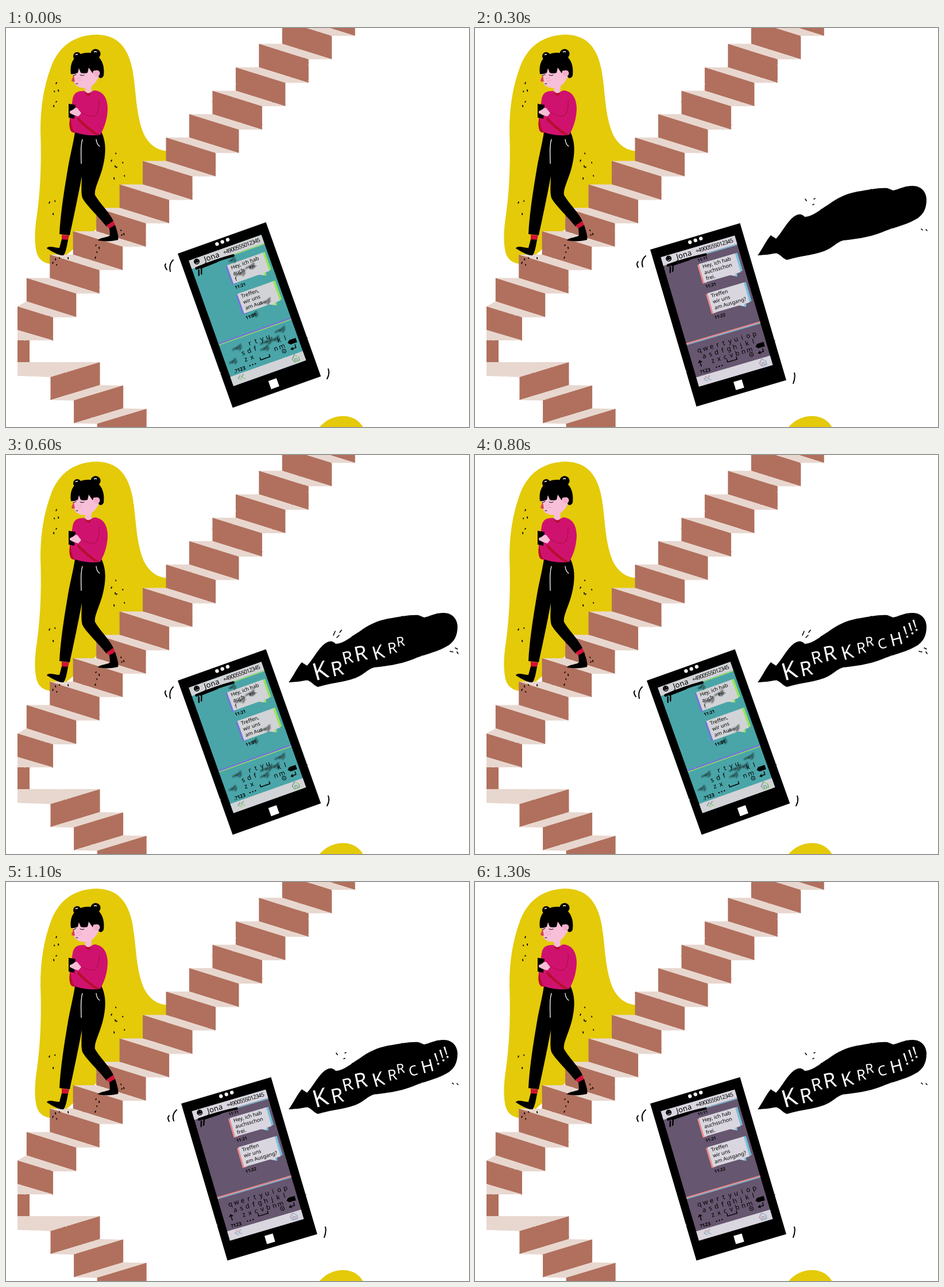
An HTML page for the animation above (1.4 s loop, 806x695 px).

```html
<!DOCTYPE html>
<html lang="de">
<head>
<meta charset="utf-8">
<title>Krrrkrrch</title>
<style>
  html, body { margin: 0; width: 100%; height: 100%; overflow: hidden; background: #fff; }
  svg { display: block; width: 806px; height: 695px; }
  text { white-space: pre; font-family: "Noto Sans", sans-serif; }
  .ink { fill: none; stroke: #000; stroke-linecap: round; stroke-linejoin: round; }
</style>
</head>
<body>
<svg viewBox="0 0 806 695">
  <defs>
    <filter id="rough" x="-2%" y="-2%" width="104%" height="104%" color-interpolation-filters="sRGB">
      <feTurbulence type="fractalNoise" baseFrequency=".35" numOctaves="2" seed="4"/>
      <feDisplacementMap in="SourceGraphic" scale="1.7" xChannelSelector="R" yChannelSelector="G"/>
    </filter>
    <filter id="soft" x="-30%" y="-30%" width="160%" height="160%"><feGaussianBlur stdDeviation=".9"/></filter>
  </defs>

  <g filter="url(#rough)" fill="#e4ca08">
    <path d="M285 214C266 215 250 205 240 185C229 160 227 128 224 100C221 66 214 42 199 27C185 12 160 9 142 13C112 18 91 36 79 66C65 103 60 140 60 180C62 235 60 280 54 325C50 350 49 372 53 390C56 402 64 409 77 411L100 400L290 235Z"/>
    <path d="M545 696C556 683 570 676 587 676C604 676 615 684 622 696Z"/>
  </g>
  <g id="stairs" filter="url(#rough)"></g>

  <g id="walker">
    <path d="M120 181C135 186 152 187 166 181C174 197 175 217 168 244C162 266 153 281 155 291C163 305 179 320 187 336L175 346C160 327 139 308 133 296C130 286 132 268 132 258C128 280 120 320 111 361L93 359C95 320 103 272 109 237C114 212 118 196 120 181Z"/>
    <path d="M133 194C129 207 131 222 131 236M157 194Q158 203 163 206" fill="none" stroke="#fff" stroke-width="1.3" stroke-linecap="round"/>
    <path d="M97 360L110 361L108 370L97 368ZM175 344L187 336L190 344L180 350Z" fill="#cf1238"/>
    <path d="M97 368L108 369C106 380 104 392 100 396C92 397 80 389 71 384C73 378 85 383 93 383ZM180 349L190 343C193 353 197 364 195 369C185 372 170 372 160 370C162 365 178 365 181 361Z"/>
    <path d="M139 98L149 100L148 118L136 117Z" fill="#f5bdd6"/>
    <path d="M137 110C126 109 118 112 116 124C114 140 108 160 112 178C114 182 117 183 121 182C135 187 153 188 164 186C171 175 177 157 177 139C176 122 170 112 157 109C151 108 148 112 145 114Q138 116 137 110Z" fill="#d0126f"/>
    <path d="M112 157C114 164 114 175 120 182C112 182 108 172 112 157ZM126 155C135 165 148 177 163 186L155 186C142 177 132 168 124 160ZM137 109Q141 116 148 112L146 118Q138 119 137 109Z" fill="#b40f2c"/>
    <path d="M130 146C141 153 153 158 160 148M162 125Q163 140 158 150" fill="none" stroke="#a50d3c" stroke-width="1"/>
    <path d="M109 132L121 134L119 158L109 156Z"/>
    <path d="M111 145L117 142C121 137 125 139 126 142L131 148L126 154C121 153 116 151 111 148Z" fill="#f5bdd6"/>
    <path d="M116 68C116 80 117 94 121 99C126 105 140 106 147 102C156 98 163 85 164 75L150 60Z" fill="#f7c0d8"/>
    <path d="M118 82Q114 90 114 92Q117 95 120 93Z" fill="#d84757"/>
    <path d="M113 80C110 56 123 43 144 43C163 44 173 62 170 83C167 89 162 88 161 84C161 75 154 72 152 75L151 79L144 69L142 78Q135 80 130 78L127 70L125 78Q119 81 113 80Z"/>
    <circle cx="124" cy="49" r="7"/><circle cx="156" cy="45" r="8.6"/>
    <path d="M121 47Q123 45 125 46M153 42Q156 40 158 42" fill="none" stroke="#fff" stroke-width="1.4"/>
    <circle cx="158" cy="79" r="5.5" fill="#f5aeca"/>
    <path class="ink" stroke-width="1" d="M117 83L122 81M129 82Q133 84 136 82M122 97L125 97"/>
    <path d="M125 88h.1M129 87h.1M131 91h.1M127 92h.1" stroke="#d84757" stroke-width="1.2" stroke-linecap="round"/>
  </g>
  <g id="specks" class="ink" stroke-width="1.8"></g>
  <g id="poses"></g>

  <path id="spark" class="ink" stroke-width="2" d="M493 395L509 385L514 386L526 381L537 378"/>
  <g id="shout">
    <path filter="url(#rough)" d="M492 396C500 386 506 371 515 361L524 367C533 358 540 343 551 332C560 323 568 322 574 329C589 328 601 316 616 307C631 296 645 289 665 285C686 282 702 278 718 279L728 283C738 281 747 275 762 275C777 275 786 286 786 299C786 315 780 327 766 334C746 345 726 348 708 356C686 365 659 368 641 370C629 373 623 383 607 389C588 396 565 397 543 404C536 402 534 396 524 392C513 395 504 395 492 396Z"/>
    <g id="letters" fill="#fff" font-weight="500" text-anchor="middle"></g>
    <path id="ticks0" class="ink" stroke-width="1.6" d="M570 314L573 307M576 318L580 314M581 309L584 305M773 342L778 343M782 336L786 338M785 343L787 346"/>
    <path id="ticks1" class="ink" stroke-width="1.6" d="M575 298L577 301M588 308L590 307M590 298L592 297M777 350L779 352M785 351L787 353"/>
  </g>
</svg>
<script>
const LOOP = 1400, STEP = 100;
const $ = id => document.getElementById(id);
const poly = (fill, ...p) => `<polygon fill="${fill}" points="${p.join(' ')}"/>`;
const rect = (x, y, w, h, fill) => `<rect x="${x}" y="${y}" width="${w}" height="${h}" fill="${fill}"/>`;
const line = (d, color, w) => `<path d="${d}" fill="none" stroke="${color}" stroke-width="${w}" stroke-linecap="round"/>`;
const text = (x, y, size, str, extra = '') => `<text x="${x}" y="${y}" font-size="${size}" ${extra}>${str}</text>`;

function stairs() {
  const brown = '#b0705d', pale = '#e8d7cf', dx = 40.45, dy = 40.8, w = 86.5, h = 27;
  let out = '';
  for (let i = 0; i < 13; i++) {
    const x = 521.2 - i * dx, y = -54 + i * dy;
    out += poly(pale, x, y, x + dx, y, x + dx + w, y + h, x + w, y + h)
         + poly(brown, x, y, x + w, y + h, x + w, y + h + dy, x, y + dy);
  }
  out += poly(pale, 20, 485, 36, 476, 122, 504, 82, 504)
       + poly(brown, 20, 485, 82, 504, 82, 545, 20, 526)
       + poly(pale, 20, 526, 82, 544, 20, 544)
       + poly(brown, 20, 544, 41, 544, 41, 582, 20, 582)
       + poly(pale, 20, 582, 163, 582, 78, 608, 20, 606);
  for (let i = 0; i < 3; i++) {
    const x = 77.5 + i * 40.6, y = 608 + i * 40.6;
    out += poly(brown, x, y, x + 86, y - 26, x + 86, y + 14, x, y + 40)
         + poly(pale, x, y + 40, x + 86, y + 14, x + 126, y + 15, x + 41, y + 41);
  }
  return out;
}

function specks() {
  const spots = [[88, 95], [84, 110], [91, 108], [88, 128], [83, 135], [191, 218], [184, 230], [203, 234],
    [190, 240], [193, 242], [188, 261], [206, 257], [76, 303], [85, 301], [82, 323], [157, 378], [162, 382],
    [158, 390], [156, 399], [200, 352], [205, 358], [202, 360], [86, 402], [88, 412], [82, 408], [93, 400], [108, 400]];
  return spots.map(([x, y], i) => `<path d="M${x} ${y}l${i % 3 ? .4 : -.8} ${i % 2 ? 1 : 2}"/>`).join('');
}

// A speech bubble with coloured fringes on both sides
function bubble(y, h, lines, p) {
  return rect(71, y + 1, 8, h, p.left) + rect(136, y, 8, h - 1, p.right)
    + poly(p.right, 122, y + h, 134, y + h, 132, y + h + 6)
    + rect(74, y, 66, h, p.paper)
    + poly(p.paper, 119, y + h - 1, 131, y + h - 1, 129, y + h + 4)
    + lines.map((s, i) => text(79, y + 9.5 + i * 10.8, 9, s, 'font-weight="500"')).join('');
}

function keyRow(x, y, keys) {
  return [...keys].map((k, i) => text(x + i * 11.1, y, 11.5, k, 'text-anchor="middle" font-weight="500"')).join('');
}

function phone(p) {
  const smears = p.smears.map(([x, y, l]) =>
    line(`M${x - l} ${y + 2}l${l} -1.5M${x - 2} ${y + 3}l${l} -5M${x + 2} ${y + 6}l${l / 2} -4`, '#101818', 2.2)).join('');
  return `<g transform="translate(${p.x} ${p.y}) rotate(${p.angle})">`
    + `<rect width="163" height="285" filter="url(#rough)"/>`
    + [70, 80, 90].map((x, i) => `<circle cx="${x}" cy="${7.2 - i * .4}" r="3.2" fill="#fff"/>`).join('')
    + rect(14, 18, 134, p.bottom - 18, p.screen)
    + rect(14, 18, 134, 15.5, p.paper)
    + line('M92 34.5H147', p.right, 1.5)
    + `<circle cx="26.5" cy="24" r="5"/>`
    + line('M24.5 22.5h.1M28.5 22.5h.1M24 26q2.5 2 5 0', p.paper, 1)
    + text(40, 29.5, 13, 'Jona', 'font-weight="500" letter-spacing=".2"')
    + text(75, 28.5, 9.8, '+4900555012345', 'font-weight="500" letter-spacing="-.8"')
    + line('M22 35Q55 33 90 35.5M30 36L60 35', '#000', 4.5)
    + line('M25 39l-3 9M30 39l-3 8', '#000', 2.4)
    + text(74, 44, 7, p.times[0], 'font-weight="600"')
    + bubble(48, 34, p.first, p) + text(74, 92, 7.5, p.times[1], 'font-weight="600"')
    + bubble(101, 36, p.second, p) + text(74, 148, 7.5, p.times[2], 'font-weight="600"')
    + line(`M15 ${p.keys}H147`, p.left, 2.6) + line(`M15 ${p.keys + 2}H147`, p.edge, 1.4)
    + `<g transform="translate(0 ${p.keys - 175})">`
    + keyRow(32.5, 196, p.rows[0]) + keyRow(38, 208, p.rows[1]) + keyRow(50, 220, p.rows[2])
    + (p.arrow ? line('M28 220V210M25 213l3 -3l3 3', '#000', 1.5) : '')
    + '<path d="M128 214l4-4h12v8h-12z"/>'
    + line('M139 221v5h-9m3 -2l-3 2l3 2M74 222v4h17v-4', '#000', 1.5)
    + line('M53 229h.1M58 229h.1M63 229h.1', '#000', 2.3)
    + '<circle cx="117.5" cy="225" r="3.2" fill="none" stroke="#000"/><circle cx="117.5" cy="225" r="1"/>'
    + text(23, 232.5, 8.5, p.arrow ? '?123' : '.?123', 'font-weight="600"') + '</g>'
    + rect(14, p.bottom - 17, 134, 17, p.paper)
    + [[0, p.left], [1, p.edge]].map(([d, c]) => `<g transform="translate(${d} ${p.bottom - 9 + d})">`
      + line('M31 -5l-5 4l5 4M37 -5l-5 4l5 4', c, 1)
      + line('M126 -1l6 -6l6 6l-1 6h-9zM130 5v-5h4v5', c, 1) + '</g>').join('')
    + rect(74, 262, 15, 15, '#fff')
    + `<g filter="url(#soft)" opacity=".75">${smears}</g>`
    + `</g><path class="ink" stroke-width="2" d="${p.shake}"/>`;
}

const poses = [
  {
    x: 299, y: 393, angle: -19.6, bottom: 250, keys: 172,
    screen: '#4aa5a8', paper: '#d2d3d6', left: '#7672dc', right: '#98e45a', edge: '#98e45a',
    times: ['', '11:21', '11:21'],
    first: ['Hey, ich hab', 'auch    en-', 'f'], second: ['Treffen,', 'wir uns', 'am Aus'],
    rows: ['   rtyu   ', ' sdf   kl', 'zx   nm'], arrow: false,
    smears: [[92, 68, 10], [112, 62, 9], [86, 41, 6], [116, 129, 11], [90, 143, 7], [43, 188, 9],
      [95, 195, 12], [124, 184, 10], [28, 208, 7], [110, 196, 9], [88, 205, 8]],
    shake: 'M280 421Q275 414 278 411M286 424Q283 412 291 404M561 594Q564 602 559 611'
  },
  {
    x: 305, y: 386, angle: -16.4, bottom: 253, keys: 175,
    screen: '#66566f', paper: '#d9d6df', left: '#e98a8c', right: '#79bfdc', edge: '#79bfdc',
    times: ['11:11', '11:21', '11:22'],
    first: ['Hey, ich hab', 'auchsschon', 'frei.'], second: ['Treffen', 'wir uns', 'am Ausgang?'],
    rows: ['qwertyuiop', 'asdfghjkl', 'zxcvbnm'], arrow: true,
    smears: [],
    shake: 'M284 417Q280 410 284 407M292 416Q288 405 297 397M556 601Q558 609 554 619'
  }
];

// glyph, centre x, baseline y, size, tilt
const glyphs = [['K', 551, 390, 42, -16], ['R', 579, 384, 35, -12], ['R', 597, 363, 30, -14], ['R', 620, 358, 36, -12],
  ['K', 651, 355, 33, -16], ['R', 674, 345, 26, -10], ['R', 688, 333, 23, -10], ['C', 711, 337, 24, -16],
  ['H', 736, 331, 30, -14], ['!', 753, 318, 29, -18], ['!', 762, 312, 29, -18], ['!', 769, 306, 28, -18]];
const typed = [0, 0, 0, 0, 1, 4, 7, 9, 12];

$('stairs').innerHTML = stairs();
$('specks').innerHTML = specks();
$('poses').innerHTML = poses.map(p => `<g>${phone(p)}</g>`).join('');
$('letters').innerHTML = glyphs.map(([c, x, y, s, r]) =>
  text(x, y, s, c, `transform="rotate(${r} ${x} ${y})"`)).join('');

const show = (el, on) => { el.style.display = on ? '' : 'none'; };

function draw(ms) {
  const step = Math.floor(ms % LOOP / STEP), side = step % 2;
  const count = typed[Math.min(step, typed.length - 1)];
  [...$('poses').children].forEach((g, i) => show(g, i === side));
  show($('spark'), step === 2);
  show($('shout'), step > 2);
  show($('ticks0'), side === 0);
  show($('ticks1'), side === 1);
  [...$('letters').children].forEach((g, i) => show(g, i < count));
}

function tick() {
  draw(performance.now());
  requestAnimationFrame(tick);
}
tick();
</script>
</body>
</html>
```
